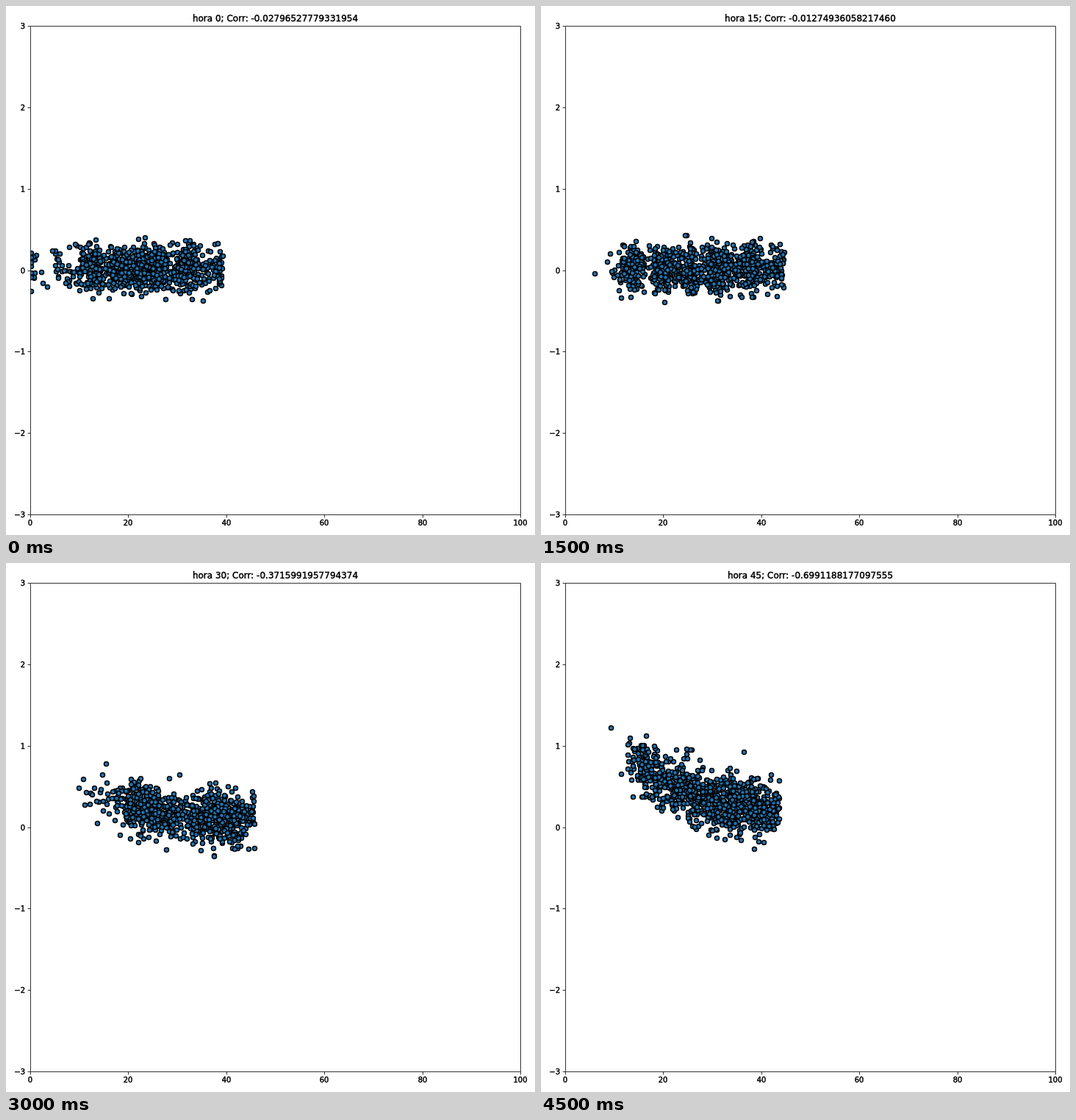
An HTML page with a canvas that plays this animation: 720 by 720 pixels, repeating every 5 s.

```html
<!DOCTYPE html>
<html lang="es">
<head>
<meta charset="utf-8">
<title>Correlación por hora</title>
<style>
  html, body { margin: 0; width: 100%; height: 100%; overflow: hidden; background: #fff; }
  canvas, svg { position: absolute; left: 0; top: 0; width: 720px; height: 720px; }
  text { font: 10px "DejaVu Sans", sans-serif; stroke: #000; stroke-width: .45px; }
  #title { font-size: 12px; }
  path { fill: none; stroke: #000; stroke-width: .8px; }
</style>
</head>
<body>
<canvas id="dots" width="720" height="720"></canvas>
<svg viewBox="0 0 720 720">
  <path id="axes"/>
  <g id="labels"></g>
  <text id="title" x="366.5" y="21" text-anchor="middle"></text>
</svg>
<script>
const LEFT = 33.5, RIGHT = 700.5, TOP = 27.5, BOTTOM = 692.5;
const STEP_MS = 500, HOURS_PER_STEP = 5;
const POINTS = 950, CLUSTER_WIDTH = 9, BACKGROUND_SHARE = 0.4;

// Each cloud spans low..high in pixels, gathers round its clusters,
// and rises by lift towards its left end.
const steps = [
  { corr: '-0.02796527779331954', low: -20, high: 296, lift: 0, clusters: [118, 150, 178, 205, 243] },
  { corr: '-0.01583204716928355', low: 5, high: 308, lift: 0, clusters: [112, 150, 190, 232] },
  { corr: '0.0023646798920304943', low: 61, high: 323, lift: 0, clusters: [110, 130, 153, 195, 233, 275] },
  { corr: '-0.01274936058217460', low: 67, high: 332, lift: 0, clusters: [125, 165, 200, 240, 285] },
  { corr: '-0.018506254145966176', low: 78, high: 338, lift: 0, clusters: [125, 177, 205, 245, 287] },
  { corr: '-0.1842930657148239', low: 90, high: 338, lift: 18, clusters: [150, 185, 225, 260, 300] },
  { corr: '-0.3715991957794374', low: 90, high: 338, lift: 38, clusters: [171, 194, 220, 267, 285, 310] },
  { corr: '-0.5565877476490115', low: 87, high: 333, lift: 57, clusters: [125, 172, 210, 260, 315] },
  { corr: '-0.6332049475374345', low: 93, high: 334, lift: 92, clusters: [150, 195, 218, 257, 297] },
  { corr: '-0.6991188177097555', low: 91, high: 324, lift: 95, clusters: [138, 157, 183, 202, 230, 258, 290] },
];

function seeded(seed) {
  return () => {
    seed = (seed + 0x6D2B79F5) | 0;
    let v = Math.imul(seed ^ (seed >>> 15), 1 | seed);
    v = (v + Math.imul(v ^ (v >>> 7), 61 | v)) ^ v;
    return ((v ^ (v >>> 14)) >>> 0) / 4294967296;
  };
}

function scatter({ low, high, lift, clusters }, seed) {
  const random = seeded(seed);
  const normal = () => Math.sqrt(-2 * Math.log(1 - random())) * Math.cos(2 * Math.PI * random());
  const spread = 15.5 + lift * 0.03;
  return Array.from({ length: POINTS }, () => {
    const x = random() < BACKGROUND_SHARE
      ? low + (high - low) * Math.sqrt(random())
      : clusters[Math.floor(random() * clusters.length)] + CLUSTER_WIDTH * normal();
    const u = Math.min(1, (x - low) / (high - low));
    const trend = 357 - lift * (0.25 + (1 - u) ** 2.3);
    return {
      x: Math.max(LEFT, Math.min(high, x)),
      y: trend + spread * normal(),
    };
  });
}

function drawAxes() {
  let d = `M${LEFT} ${TOP}H${RIGHT}V${BOTTOM}H${LEFT}Z`;
  let labels = '';
  for (let i = 0; i <= 5; i++) {
    const x = Math.round(33 + i * 133.4) + 0.5;
    d += `M${x} ${BOTTOM}v4`;
    labels += `<text x="${x - 0.5}" y="707" text-anchor="middle">${i * 20}</text>`;
  }
  for (let v = -3; v <= 3; v++) {
    const y = Math.round(359.6 - v * 110.8) + 0.5;
    d += `M${LEFT} ${y}h-4`;
    labels += `<text x="26" y="${y + 3.5}" text-anchor="end">${v < 0 ? '−' : ''}${Math.abs(v)}</text>`;
  }
  document.getElementById('axes').setAttribute('d', d);
  document.getElementById('labels').innerHTML = labels;
}

const ctx = document.getElementById('dots').getContext('2d');
const title = document.getElementById('title');
const clouds = steps.map((step, i) => scatter(step, 101 + i));

ctx.beginPath();
ctx.rect(LEFT, TOP, RIGHT - LEFT, BOTTOM - TOP);
ctx.clip();
ctx.fillStyle = '#1f77b4';
ctx.strokeStyle = '#000';
ctx.lineWidth = 1.5;

function show(index) {
  title.textContent = `hora ${index * HOURS_PER_STEP}; Corr: ${steps[index].corr}`;
  ctx.clearRect(0, 0, 720, 720);
  for (const { x, y } of clouds[index]) {
    ctx.beginPath();
    ctx.arc(Math.round(x) + 0.5, Math.round(y) + 0.5, 3, 0, 2 * Math.PI);
    ctx.fill();
    ctx.stroke();
  }
}

const start = performance.now();
let shown = -1;
function tick() {
  const index = Math.floor((performance.now() - start) / STEP_MS) % steps.length;
  if (index !== shown) show(shown = index);
  requestAnimationFrame(tick);
}

drawAxes();
tick();
</script>
</body>
</html>
```
